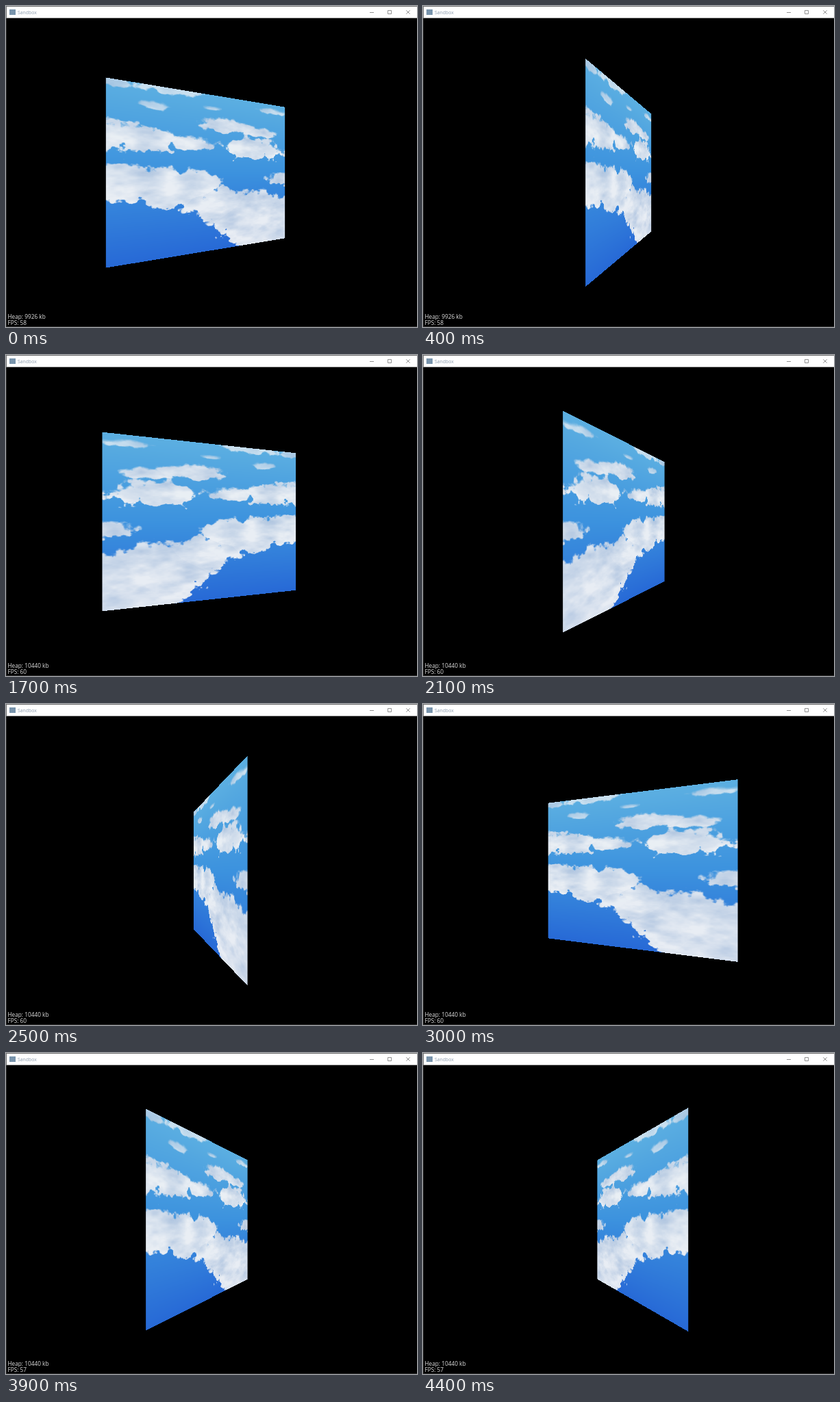
Recreate the animation shown at these times as an HTML page with a canvas. Size 600 by 469 pixels, loop 4500 ms.

```html
<!DOCTYPE html>
<html lang="en">
<head>
<meta charset="utf-8">
<title>Sandbox</title>
<style>
  html, body { margin: 0; width: 100%; height: 100%; overflow: hidden; background: #000; }
  canvas { display: block; width: 600px; height: 469px; }
</style>
</head>
<body>
<canvas id="stage" width="600" height="469"></canvas>
<script>
const ctx = document.getElementById('stage').getContext('2d');
const LOOP = 4500, STEP = 100;

// Panel seen face-on: half size, centre on the stage, depth ratio
const HW = 151.3, HH = 113.5, CX = 300.5, CY = 243.5, DEPTH = 1 / 3;
const RES = 2;

const sky = document.createElement('canvas');
sky.width = Math.round(HW * 2 * RES);
sky.height = HH * 2 * RES;

const mix = (a, b, k) => a + (b - a) * k;
const clamp = (v, lo = 0, hi = 1) => Math.max(lo, Math.min(hi, v));
const smooth = k => k * k * (3 - 2 * k);
const blend = (a, b, k) => a.map((v, i) => mix(v, b[i], k));

function hash(x, y) {
  let h = Math.imul(x, 374761393) + Math.imul(y, 668265263);
  h = Math.imul(h ^ (h >>> 13), 1274126177);
  return ((h ^ (h >>> 16)) >>> 0) / 4294967296;
}

function noise(x, y) {
  const ix = Math.floor(x), iy = Math.floor(y);
  const u = smooth(x - ix), v = smooth(y - iy);
  return mix(
    mix(hash(ix, iy), hash(ix + 1, iy), u),
    mix(hash(ix, iy + 1), hash(ix + 1, iy + 1), u), v);
}

// Layered noise around zero
function fbm(x, y) {
  let sum = 0;
  for (let o = 0, amp = 0.5; o < 4; o++, amp /= 2) {
    sum += (noise(x, y) - 0.5) * amp;
    x = x * 2 + 17;
    y = y * 2 + 31;
  }
  return sum;
}

const clouds = [];
const cloud = (x, y, rx, ry) => clouds.push({ x, y, rx, ry });

// Far clouds along the top
cloud(-142, -111, 19, 7);
cloud(-72, -113, 46, 7);
cloud(121, -102, 28, 4);
cloud(-89, -87, 20, 5);
cloud(1, -94, 12, 2);
// Upper row
cloud(28, -70, 51, 9);
cloud(96, -65, 27, 7);
// Middle row
cloud(-112, -45, 64, 17);
cloud(-38, -41, 38, 9);
cloud(82, -38, 62, 17);
cloud(142, 11, 31, 10);
// Near left
cloud(-125, 14, 50, 23);
cloud(-72, 22, 46, 27);
cloud(-22, 15, 31, 21);
// Near right
cloud(20, 47, 60, 24);
cloud(85, 72, 76, 43);
cloud(130, 85, 82, 46);
cloud(-4, 74, 6, 3);

// Height above the nearest cloud edge, and the place between its top and base
function coverAt(x, y) {
  const rough = fbm(x / 13, y / 9);
  let best = -9, level = 0;
  for (const c of clouds) {
    const dx = (x - c.x) / c.rx, dy = (y - c.y) / c.ry;
    if (Math.abs(dx) > 1.4 || Math.abs(dy) > 1.6) continue;
    const d = (1 - Math.hypot(dx, dy)) * c.ry + rough * Math.min(24, c.ry * 1.6);
    if (d > best) {
      best = d;
      level = dy;
    }
  }
  return { depth: best, level };
}

function skyColor(v) {
  const high = [92, 175, 225], mid = [60, 146, 222], low = [39, 105, 214];
  return v < 0.5 ? blend(high, mid, v * 2) : blend(mid, low, v * 2 - 1);
}

function paintSky() {
  const sk = sky.getContext('2d');
  const img = sk.createImageData(sky.width, sky.height);
  const shade = [176, 196, 222], light = [240, 242, 245];
  let i = 0;
  for (let py = 0; py < sky.height; py++) {
    const y = py / RES - HH;
    const base = skyColor(py / sky.height);
    for (let px = 0; px < sky.width; px++) {
      const x = px / RES - HW;
      const { depth, level } = coverAt(x, y);
      const soft = level < 0 ? 2.2 : 1.1;
      const cover = smooth(clamp((depth + soft) / (2 * soft))) * (y < -80 ? 0.75 : 0.96);
      let rgb = base;
      if (cover > 0) {
        const tone = clamp(0.68 + fbm(x / 34 + 50, y / 13 + 9) * 1.5 + level * 0.12);
        rgb = blend(base, blend(shade, light, tone), cover);
      }
      img.data.set([...rgb, 255], i);
      i += 4;
    }
  }
  sk.putImageData(img, 0, 0);
}

function drawPanel(deg) {
  const a = deg * Math.PI / 180;
  const w = HW * Math.cos(a), m = DEPTH * Math.sin(a);
  const [left, right] = [CX - w / (1 - m), CX + w / (1 + m)].sort((p, q) => p - q);
  for (let x = Math.floor(left); x < right; x++) {
    const dx = x + 0.5 - CX;
    const s = clamp(dx / (w - m * dx), -1, 1);
    const h = HH / (1 + m * s);
    const sw = clamp(Math.abs(w / (w - m * dx) ** 2) * sky.width / 2, 0.5, 60);
    const sx = clamp((s + 1) / 2 * sky.width - sw / 2, 0, sky.width - sw);
    ctx.globalAlpha = Math.min(right, x + 1) - Math.max(left, x);
    ctx.drawImage(sky, sx, 0, sw, sky.height, x, CY - h, 1, h * 2);
  }
  ctx.globalAlpha = 1;
}

function box(color, x, y, w, h) {
  ctx.fillStyle = color;
  ctx.fillRect(x, y, w, h);
}

function label(text, x, y, size, color) {
  ctx.font = `${size}px "Open Sans", "Noto Sans", sans-serif`;
  ctx.fillStyle = color;
  ctx.fillText(text, x, y);
}

function drawWindow() {
  box('#000', 0, 0, 600, 469);
  box('#2c2c2c', 0, 18, 1, 451);
  box('#2c2c2c', 0, 468, 600, 1);
  box('#fff', 0, 0, 600, 17.6);
  box('#6c6c6c', 0, 0, 600, 1);
  box('#6c6c6c', 0, 0, 1, 18);
  box('#7894ac', 5, 5, 9, 8);
  label('Sandbox', 17, 11.6, 6.9, '#8c9cae');

  ctx.strokeStyle = '#777';
  ctx.lineWidth = 0.8;
  ctx.beginPath();
  ctx.moveTo(531, 9.5);
  ctx.lineTo(537, 9.5);
  ctx.rect(557.5, 6.5, 5, 5);
  ctx.moveTo(584.3, 6.3);
  ctx.lineTo(589.7, 11.7);
  ctx.moveTo(589.7, 6.3);
  ctx.lineTo(584.3, 11.7);
  ctx.stroke();
}

function render(t) {
  const fps = t < 500 ? 58 : t < 1500 ? 59 : t < 3500 ? 60 : 57;
  drawWindow();
  drawPanel(33.45 + t * 0.1);
  label(`Heap: ${t < 500 ? 9926 : 10440} kb`, 2.4, 457, 8.3, '#dedede');
  label(`FPS: ${fps}`, 2.4, 466, 8.3, '#dedede');
}

paintSky();
const start = performance.now();
function tick() {
  const t = (performance.now() - start) % LOOP;
  render(Math.floor(t / STEP) * STEP);
  requestAnimationFrame(tick);
}
tick();
</script>
</body>
</html>
```
